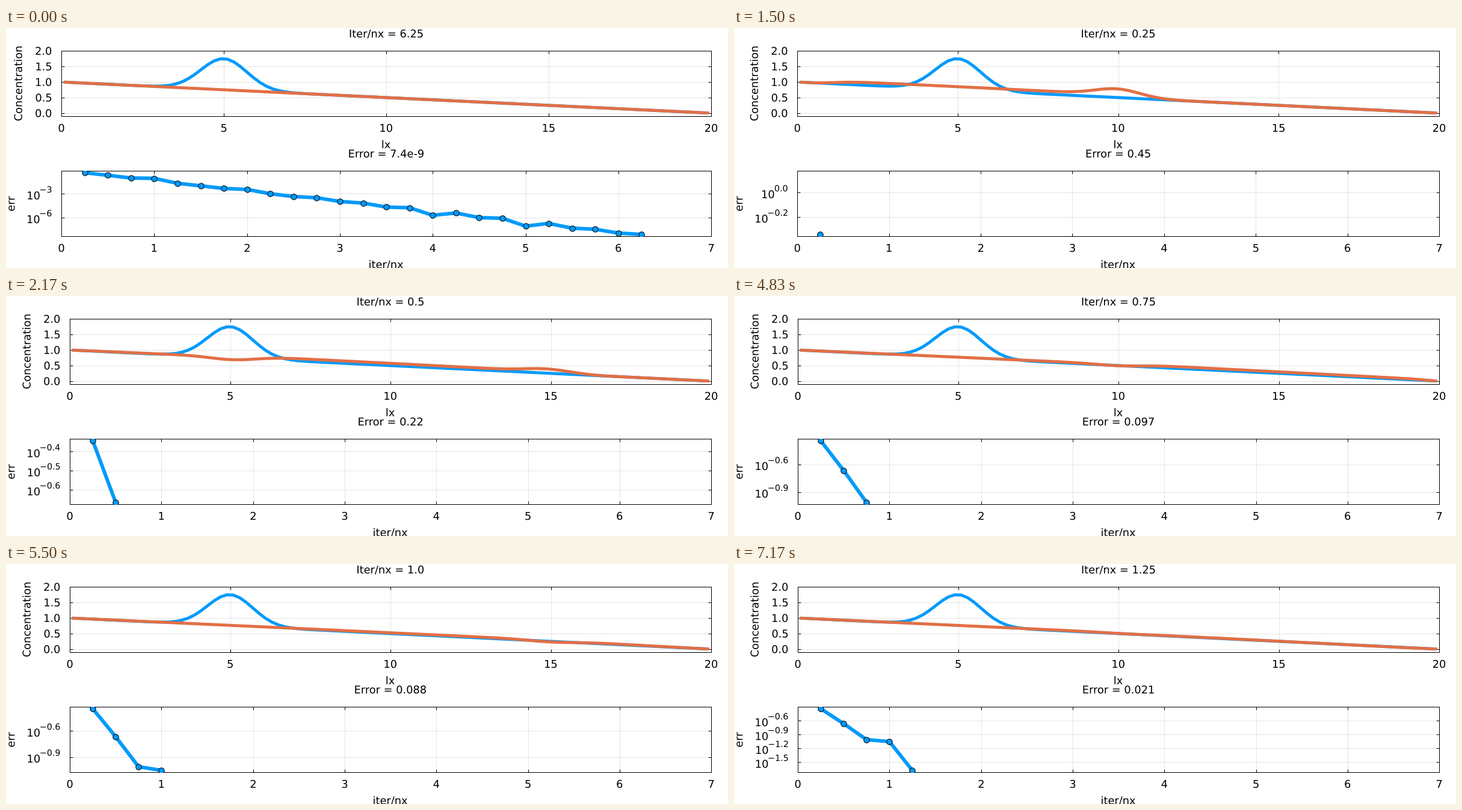
Recreate the animation shown at these times as a matplotlib script. Size 1200x400 px, loop 8000 ms.

```python
import numpy as np
import matplotlib.pyplot as plt
from matplotlib.animation import FuncAnimation
from matplotlib.patches import PathPatch
from matplotlib.textpath import TextPath
from matplotlib.transforms import Affine2D

W, H, DPI = 1200, 400, 100
PT = 72 / DPI                      # points per pixel
FONT = 17.8                        # pixels
BLUE, ORANGE = "#009afa", "#e26f46"
RIGHT = 1172.1
STEP, LOOP = 50, 8000              # ms

plt.rcParams["font.family"] = "DejaVu Sans"

# Start time (ms), number of error checks done, left edge of the plots,
# exponents marked on the error axis
STATES = [
    (0, 25, 92.1, (-3, -6)),
    (500, 1, 105.3, (0.0, -0.2)),
    (2170, 2, 106.1, (-0.4, -0.5, -0.6)),
    (3830, 3, 106.1, (-0.6, -0.9)),
    (5500, 4, 106.1, (-0.6, -0.9)),
    (7170, 5, 106.1, (-0.6, -0.9, -1.2, -1.5)),
]


def solve(lx=20.0, nx=100, checks=25):
    """Accelerated pseudo-transient diffusion, stored every nx/4 steps."""
    dx = lx / nx
    x = np.linspace(dx / 2, lx - dx / 2, nx)
    rho = (lx / (2 * np.pi)) ** 2
    dt = dx * np.sqrt(rho)
    c = 1 + np.exp(-(x - lx / 4) ** 2) - x / lx
    q = np.zeros(nx - 1)
    profiles, errors = [c.copy()], []
    for it in range(1, checks * nx // 4 + 1):
        q -= dt / (rho + dt) * (q + np.diff(c) / dx)
        c[1:-1] -= dt * np.diff(q) / dx
        if it % (nx // 4) == 0:
            profiles.append(c.copy())
            errors.append(np.abs(np.diff(np.diff(c) / dx) / dx).max())
    return x, profiles, np.array(errors)


X, PROFILES, ERRORS = solve()
LOGS = np.log10(ERRORS)

fig = plt.figure(figsize=(W / DPI, H / DPI), dpi=DPI, facecolor="white")


def label(x, y, text, size=FONT, align=0.5, angle=0):
    """Text on baseline y; align 0.5 centres it on x, 1 ends it there.

    Outlines keep sub-pixel positions. Returns the left edge of the ink.
    """
    path = TextPath((0, 0), text, size=size)
    box = path.get_extents()
    shift = box.x0 + align * box.width
    place = (Affine2D().translate(-shift, 0).rotate_deg(angle)
             .translate(x, H - y).scale(1 / DPI))
    fig.add_artist(PathPatch(path, fc="black", lw=0, snap=False,
                             transform=place + fig.dpi_scale_trans))
    return x - align * box.width


def panel(left, top, bottom, xlim, ylim, xticks, yticks):
    ax = fig.add_axes([left / W, 1 - bottom / H,
                       (RIGHT - left) / W, (bottom - top) / H])
    ax.set(xlim=xlim, ylim=ylim, xticks=xticks, yticks=yticks)
    ax.set_axisbelow(True)
    ax.grid(color="black", alpha=0.1, lw=PT)
    ax.tick_params(direction="in", length=5 * PT, width=PT, top=True,
                   right=True, labelbottom=False, labelleft=False)
    for spine in ax.spines.values():
        spine.set(linewidth=PT, zorder=1)
    for v in xticks:
        px = left + (RIGHT - left) * (v - xlim[0]) / (xlim[1] - xlim[0])
        label(px, bottom + 25.9, str(v))
    return ax


def curve(ax, x, y, color, width, **kw):
    ax.plot(x, y, color=color, lw=width * PT, solid_capstyle="round",
            solid_joinstyle="round", zorder=3, snap=False, **kw)


def concentration(n, left):
    top, bottom = 38.1, 147.1
    lo, hi = -0.1, 2.0
    ticks = [0.0, 0.5, 1.0, 1.5, 2.0]
    mid = (left + RIGHT) / 2
    ax = panel(left, top, bottom, (0, 20), (lo, hi), range(0, 21, 5), ticks)
    curve(ax, X, PROFILES[0], BLUE, 5)
    curve(ax, X, PROFILES[n], ORANGE, 5)
    for v in ticks:
        y = top + (bottom - top) * (hi - v) / (hi - lo)
        label(left - 16.9, y + 6.5, f"{v:.1f}", align=1)
    label(mid, 15.7, f"Iter/nx = {n / 4:.2f}".removesuffix("0"))
    label(mid, 200.4, "lx")
    label(left - 65.4, (top + bottom) / 2, "Concentration", angle=90)


def error(n, left, ticks):
    top, bottom = 238.1, 347.1
    logs = LOGS[:n]
    lo = logs.min()
    hi = logs.max() if n > 1 else np.log10(ERRORS[0] + 1)
    pad = 0.03 * (hi - lo)
    lo, hi = lo - pad, hi + pad
    mid = (left + RIGHT) / 2
    ax = panel(left, top, bottom, (0, 7), (lo, hi), range(8), ticks)
    curve(ax, np.arange(1, n + 1) / 4, logs, BLUE, 6, marker="o",
          ms=9.4 * PT, mec="black", mew=PT)
    for v in ticks:
        y = top + (bottom - top) * (hi - v) / (hi - lo)
        power = str(v).replace("-", "\u2212")
        edge = label(left - 16.6, y - 2, power, 0.8 * FONT, align=1)
        label(edge - 1.4, y + 9.3, "10", align=1)
    value = f"{ERRORS[n - 1]:.2g}".replace("e-0", "e-")
    label(mid, 215.7, f"Error = {value}")
    label(mid, 400.4, "iter/nx")
    label(14.3, (top + bottom) / 2, "err", angle=90)


def draw(i):
    t = i * STEP
    _, n, left, ticks = [s for s in STATES if s[0] < t + STEP][-1]
    fig.clear()
    concentration(n, left)
    error(n, left, ticks)
    return []


anim = FuncAnimation(fig, draw, frames=LOOP // STEP, interval=STEP,
                     init_func=lambda: [], repeat=True, repeat_delay=0,
                     blit=False)
plt.show()
```
